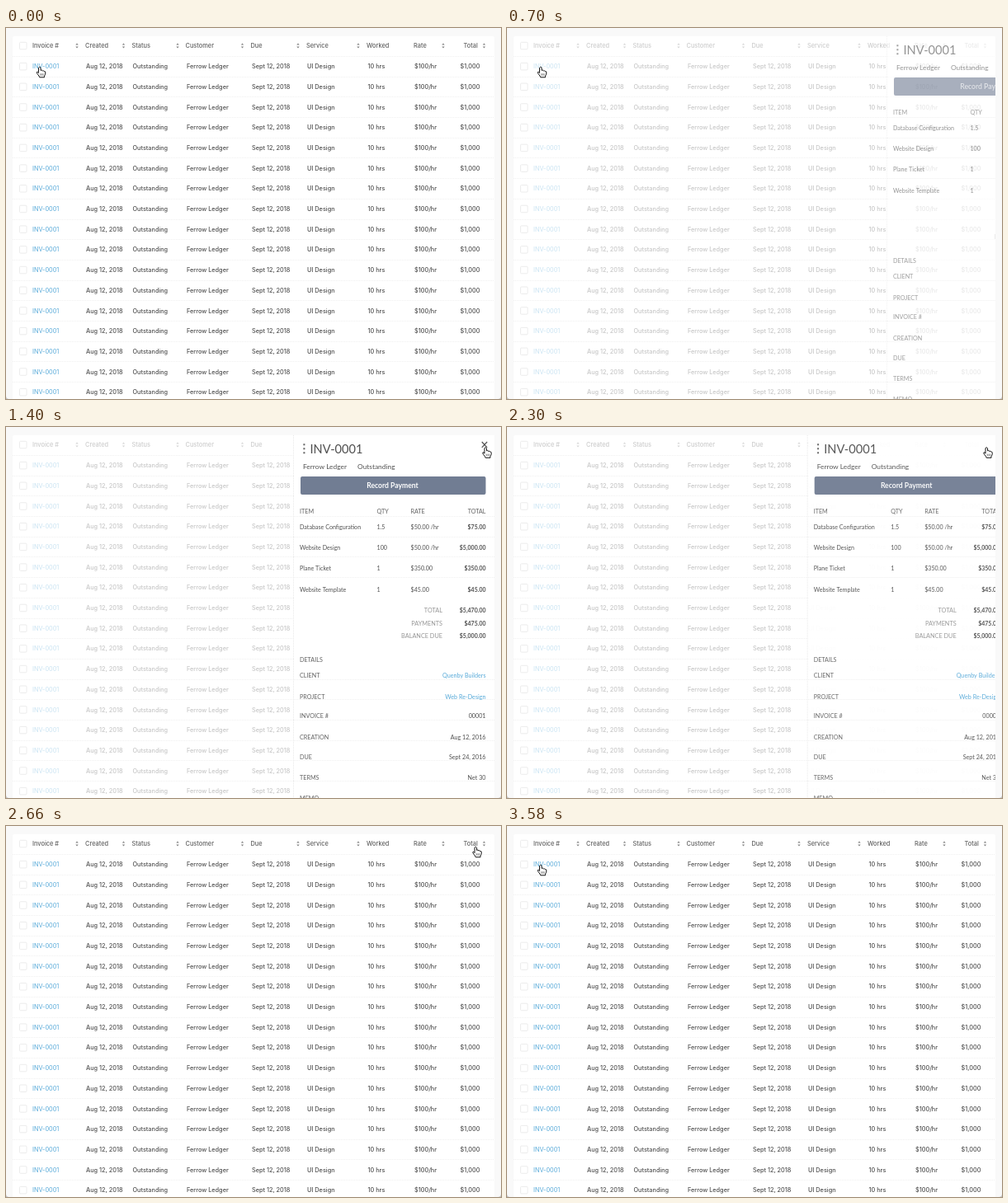
An HTML page with a canvas that plays this animation: 600 by 450 pixels, repeating every 3600 ms.

```html
<!DOCTYPE html>
<html lang="en">
<head>
<meta charset="utf-8">
<title>Invoices</title>
<style>
  html, body { margin: 0; width: 100%; height: 100%; overflow: hidden; background: #f9f9f9; }
  canvas { display: block; width: 600px; height: 450px; }
</style>
</head>
<body>
<canvas id="stage"></canvas>
<script>
const LOOP = 3600, W = 600, H = 450;
const OPEN = 441, CLOSE = 2290, SLIDE = 500;
const CARD = { left: 8, top: 10, right: 592 };
const PANEL = { left: 349, width: 243 };
const ROW_H = 24.69, ROWS = 17;
const SANS = 'Inter, sans-serif', LATO = 'Lato, sans-serif';
const BLUE = '#56a9d8', INK = '#505050', LABEL = '#626262', SOFT = '#969696';
const RULE = '#f0f0f0', CHECK = '#e8e8e8';

const canvas = document.getElementById('stage');
const ctx = canvas.getContext('2d');
const dpr = window.devicePixelRatio || 1;
canvas.width = W * dpr;
canvas.height = H * dpr;

// header, header x, cell, cell x, sort arrow x
const columns = [
  ['Invoice #', 32, 'INV-0001', 32, 86],
  ['Created', 96, 'Aug 12, 2018', 97, 142.5],
  ['Status', 152.5, 'Outstanding', 153.5, 208],
  ['Customer', 217.5, 'Ferrow Ledger', 219, 286.5],
  ['Due', 296.5, 'Sept 12, 2018', 298, 354],
  ['Service', 364, 'UI Design', 365, 427],
  ['Worked', 437, '10 hrs', 438.5, 0],
  ['Rate', 494, '$100/hr', 495, 530],
  ['Total', 554.5, '$1,000', 550.5, 579.5]
];
const items = [
  ['Database Configuration', '1.5', '$50.00 /hr', '$75.00', 121.5],
  ['Website Design', '100', '$50.00 /hr', '$5,000.00', 146.5],
  ['Plane Ticket', '1', '$350.00', '$350.00', 171],
  ['Website Template', '1', '$45.00', '$45.00', 197]
];
const totals = [
  ['TOTAL', '$5,470.00', 222],
  ['PAYMENTS', '$475.00', 238],
  ['BALANCE DUE', '$5,000.00', 253.3]
];
const details = [
  ['CLIENT', 'Quenby Builders', 301.7, BLUE],
  ['PROJECT', 'Web Re-Design', 327, BLUE],
  ['INVOICE #', '00001', 350.8],
  ['CREATION', 'Aug 12, 2016', 376],
  ['DUE', 'Sept 24, 2016', 400.3],
  ['TERMS', 'Net 30', 425],
  ['MEMO', '', 450]
];

const clamp = v => Math.min(1, Math.max(0, v));
const span = (t, start, length) => clamp((t - start) / length);
const outCubic = u => 1 - (1 - u) ** 3;
const inOutQuad = u => u < .5 ? 2 * u * u : 1 - 2 * (1 - u) ** 2;
const inOutCubic = u => u < .5 ? 4 * u ** 3 : 1 - 4 * (1 - u) ** 3;

// y is the middle of the capitals
function text(str, x, y, size, color, { font = LATO, weight = 400, align = 'left' } = {}) {
  ctx.font = `${weight} ${size}px ${font}`;
  ctx.fillStyle = color;
  ctx.textAlign = align;
  ctx.fillText(str, x, y + size * .36);
}

function box(x, y, w, h, r, fill, stroke) {
  ctx.beginPath();
  ctx.roundRect(x, y, w, h, r);
  if (fill) { ctx.fillStyle = fill; ctx.fill(); }
  if (stroke) { ctx.strokeStyle = stroke; ctx.lineWidth = .8; ctx.stroke(); }
}

function line(x1, y1, x2, y2, color, width = 1, dash = []) {
  ctx.beginPath();
  ctx.setLineDash(dash);
  ctx.moveTo(x1, y1);
  ctx.lineTo(x2, y2);
  ctx.strokeStyle = color;
  ctx.lineWidth = width;
  ctx.stroke();
  ctx.setLineDash([]);
}

function sortArrows(x, y) {
  ctx.fillStyle = '#808080';
  for (const dir of [-1, 1]) {
    ctx.beginPath();
    ctx.moveTo(x - 1.7, y + dir * .9);
    ctx.lineTo(x + 1.7, y + dir * .9);
    ctx.lineTo(x, y + dir * 3);
    ctx.fill();
  }
}

const rowY = i => 46.6 + i * ROW_H;

function rowLines(x1, x2, from, to) {
  for (let i = from; i <= to; i++) {
    const y = Math.round(34 + i * ROW_H) + .5;
    line(x1, y, x2, y, RULE, 1, [1, 1]);
  }
}

function table(alpha) {
  rowLines(CARD.left, CARD.right, 0, ROWS - 1);
  box(16.5, 17.3, 8.5, 8.5, 1, '#fff', CHECK);
  for (let i = 0; i < ROWS; i++) box(16.5, rowY(i) - 4.2, 8.5, 8.5, 1, '#fff', CHECK);

  ctx.globalAlpha = alpha;
  columns.forEach(([head, hx, cell, cx, arrow], c) => {
    text(head, hx, 21.5, 7.4, LABEL, { font: SANS, weight: 500 });
    if (arrow) sortArrows(arrow, 21.5);
    for (let i = 0; i < ROWS; i++)
      text(cell, cx, rowY(i), 7.3, c ? INK : BLUE, { font: SANS, weight: c ? 500 : 400 });
  });
  ctx.globalAlpha = 1;
}

function panel(shown) {
  if (shown <= 0) return;
  const right = { align: 'right' }, bold = { align: 'right', weight: 700 };
  ctx.save();
  ctx.beginPath();
  ctx.rect(CARD.left, CARD.top, CARD.right - CARD.left, H);
  ctx.clip();
  ctx.globalAlpha = shown ** .8;
  ctx.translate((1 - shown) * PANEL.width, 0);

  ctx.fillStyle = '#fff';
  ctx.fillRect(PANEL.left, CARD.top, PANEL.width, H);
  line(PANEL.left - .5, CARD.top, PANEL.left - .5, H, '#e8e8e8', 1, [1, 1]);
  rowLines(PANEL.left, CARD.right, 3, 6);
  rowLines(PANEL.left, CARD.right, 11, 16);

  ctx.fillStyle = LABEL;
  for (const y of [21.3, 26.3, 31.3]) ctx.fillRect(360.4, y - 1, 2, 2);
  text('INV-0001', 368.5, 26.3, 14.6, INK);
  line(576.8, 18, 583.2, 24.8, INK, 1.2);
  line(583.2, 18, 576.8, 24.8, INK, 1.2);
  text('Ferrow Ledger', 360, 47.5, 8.4, INK);
  text('Outstanding', 426, 47.5, 8.4, INK);
  box(357, 60, 224.5, 22, 2, '#717d93');
  text('Record Payment', 468.5, 70.5, 8.6, '#fff', { weight: 700, align: 'center' });

  text('ITEM', 356, 102.2, 7.2, LABEL);
  text('QTY', 449.5, 102.2, 7.2, LABEL);
  text('RATE', 490.5, 102.2, 7.2, LABEL);
  text('TOTAL', 581.5, 102.2, 7.2, LABEL, right);
  for (const [name, qty, rate, total, y] of items) {
    text(name, 356, y, 7.15, INK);
    text(qty, 449.5, y, 7.15, INK);
    text(rate, 490.5, y, 7.15, INK);
    text(total, 581.5, y, 7, INK, bold);
  }
  for (const [label, sum, y] of totals) {
    text(label, 529, y, 7.3, SOFT, right);
    text(sum, 581.5, y, 7, INK, bold);
  }
  text('DETAILS', 356, 282.3, 7.2, LABEL);
  for (const [label, value, y, color = INK] of details) {
    text(label, 356, y, 7.2, LABEL);
    text(value, 581.5, y, 7.2, color, right);
  }
  ctx.restore();
}

function hand(x, y) {
  ctx.save();
  ctx.translate(x, y);
  ctx.beginPath();
  ctx.moveTo(-1, 6.5);
  ctx.lineTo(-1, 1);
  ctx.quadraticCurveTo(.2, -1, 1.5, 1);
  ctx.lineTo(1.6, 4.2);
  ctx.quadraticCurveTo(3, 3.2, 3.8, 4.7);
  ctx.quadraticCurveTo(5.2, 4, 5.7, 5.4);
  ctx.quadraticCurveTo(7.4, 5, 7.3, 7);
  ctx.quadraticCurveTo(7.3, 9.3, 6, 11);
  ctx.lineTo(6, 12.6);
  ctx.lineTo(.2, 12.6);
  ctx.quadraticCurveTo(-.4, 10.8, -2, 9);
  ctx.quadraticCurveTo(-4.2, 6.6, -2.8, 6);
  ctx.quadraticCurveTo(-2, 5.8, -1, 7.4);
  ctx.closePath();
  ctx.fillStyle = '#fff';
  ctx.fill();
  ctx.strokeStyle = '#111';
  ctx.lineWidth = 1;
  ctx.lineJoin = 'round';
  ctx.stroke();
  for (const fx of [1.2, 2.9, 4.6]) line(fx, 8, fx, 10.6, '#333', .6);
  ctx.restore();
}

function corners() {
  ctx.fillStyle = '#c4c4c4';
  for (const [x, dir] of [[0, 1], [W, -1]]) {
    ctx.beginPath();
    ctx.moveTo(x, H - 4);
    ctx.quadraticCurveTo(x, H, x + dir * 4, H);
    ctx.lineTo(x, H);
    ctx.fill();
  }
}

function draw(t) {
  const closing = t >= CLOSE;
  const shown = closing ? 1 - outCubic(span(t, CLOSE, SLIDE)) : inOutQuad(span(t, OPEN, SLIDE));
  const dim = closing ? 1 - span(t, CLOSE + 10, 150) : span(t, OPEN, 240);
  const away = inOutCubic(span(t, 966, 430)) - inOutCubic(span(t, 2585, 430));

  ctx.setTransform(dpr, 0, 0, dpr, 0, 0);
  ctx.fillStyle = '#f9f9f9';
  ctx.fillRect(0, 0, W, H);
  box(CARD.left, CARD.top, CARD.right - CARD.left, H, 2, '#fff');
  table(1 - .68 * dim);
  panel(shown);
  corners();
  hand(40.5 + 540.5 * away, 47.2 - 22.5 * away);
}

const begin = performance.now();
function tick() {
  draw((performance.now() - begin) % LOOP);
  requestAnimationFrame(tick);
}
tick();
</script>
</body>
</html>
```
